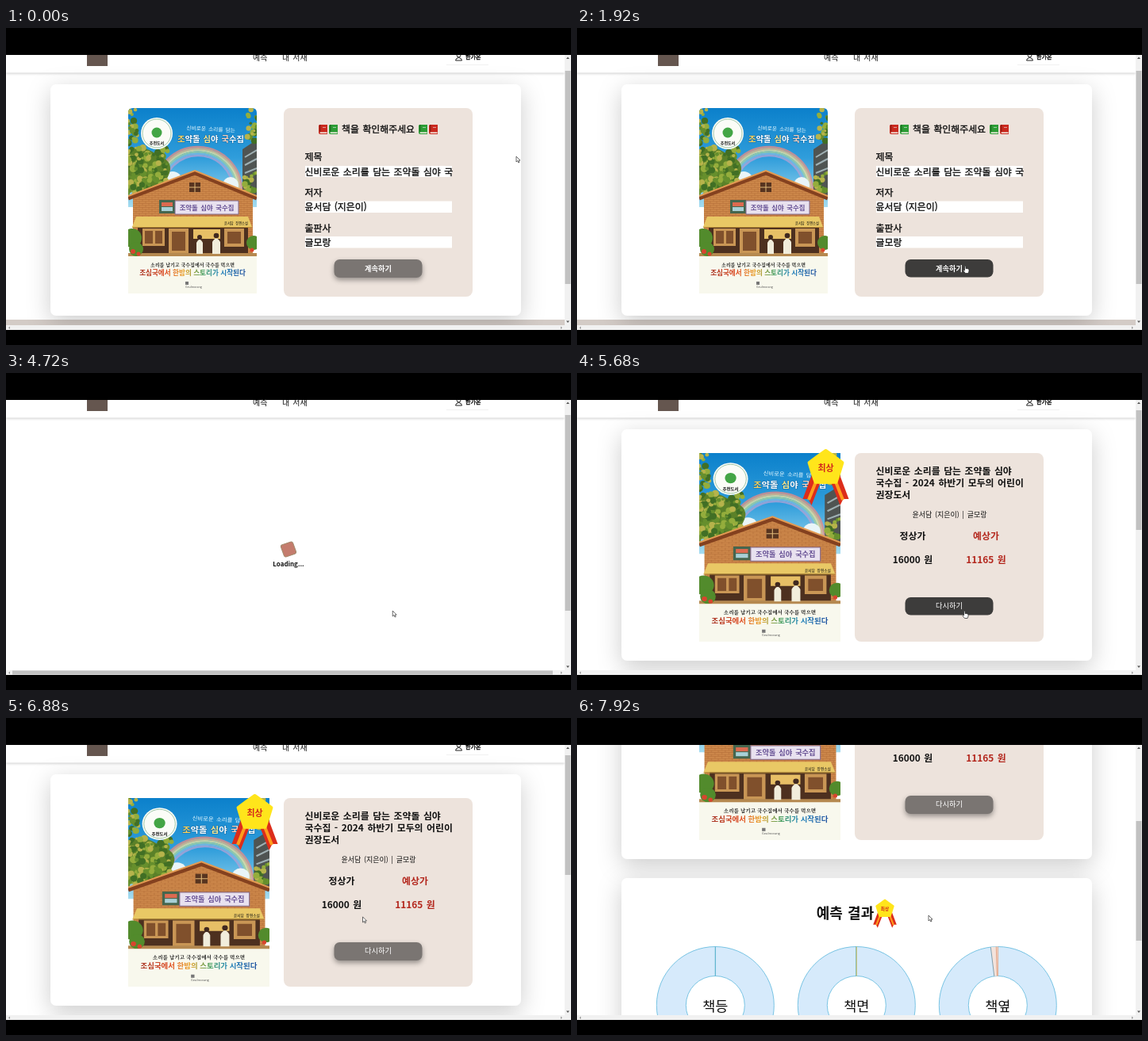
An HTML page that plays this animation: 712 px wide and 400 px high, repeating every 8 s.

```html
<!DOCTYPE html>
<html lang="ko">
<head>
<meta charset="utf-8">
<style>
  html, body { margin: 0; width: 100%; height: 100%; overflow: hidden; background: #000; }
  svg { font: 11.9px "Noto Sans CJK KR", "Noto Sans CJK", "Noto Sans", sans-serif; word-spacing: 1.2px; }
  #stage { display: block; width: 712px; height: 400px; }
  text { fill: #111; }
  .mid { text-anchor: middle; }
  .medium text, text.medium { stroke: #111; stroke-width: .35px; }
  .bold { font-weight: 700; }
  .small { font-size: 9.2px; }
  .red { fill: #b3261c; }
  .card { fill: #fff; filter: drop-shadow(0 8px 15px rgba(0,0,0,.2)); }
  .panel { fill: #ede3dc; }
  .rest { fill: #7a7572; filter: drop-shadow(0 3px 3px rgba(0,0,0,.38)); }
  .hover { fill: #3d3c3b; }
  .button text { fill: #fff; }
</style>
</head>
<body>
<svg id="stage" viewBox="0 0 712 400">
  <defs>
    <clipPath id="view"><rect y="34" width="704" height="341"/></clipPath>
    <clipPath id="coverEdge"><path d="M0 6Q0 0 6 0H156Q162 0 162 6V234H0Z"/></clipPath>
    <linearGradient id="sky" x2="0" y2="1"><stop stop-color="#0b80cb"/><stop offset=".5" stop-color="#2f9ddb"/><stop offset="1" stop-color="#a5dcf0"/></linearGradient>
    <linearGradient id="spectrum"><stop stop-color="#a52c1c"/><stop offset=".25" stop-color="#df4a20"/><stop offset=".42" stop-color="#e9a024"/><stop offset=".6" stop-color="#3c9a58"/><stop offset=".75" stop-color="#2387bd"/><stop offset="1" stop-color="#1d4f9e"/></linearGradient>
    <pattern id="brick" width="8" height="5" patternUnits="userSpaceOnUse"><path fill="#cf8a4c" d="M0 0H8V5H0Z"/><path d="M0 .5H8M2 0V2.5M6 2.5V5M0 3H8" stroke="#b06a35" stroke-width=".6"/></pattern>

    <symbol id="cover" viewBox="0 0 162 234" preserveAspectRatio="none">
      <path fill="url(#sky)" d="M0 0H162V125H0Z"/>
      <g id="rainbow" fill="none" stroke-width="2.4" opacity=".75"></g>
      <g fill="#e9f5f8"><circle cx="56" cy="92" r="12"/><circle cx="42" cy="100" r="14"/><circle cx="129" cy="97" r="10"/></g>
      <path fill="#4f5452" d="M144 52L162 40V110H144Z"/>
      <path stroke="#9fb0b3" stroke-width="2" d="M147 62L162 53M147 72L162 64M147 82L162 76"/>
      <path fill="#5b8129" d="M0 52Q16 46 32 56Q58 66 52 82Q44 104 20 106H0Z"/>
      <g id="leaves"></g>
      <path fill="url(#brick)" d="M6 110L84 84L157 110V190H6Z"/>
      <path fill="none" stroke="#84411f" stroke-width="5" d="M0 114L84 82L162 114"/>
      <path fill="none" stroke="#e39a52" stroke-width="2" d="M0 111L84 79L162 111"/>
      <path fill="#57341f" d="M77 94H91V106H77Z"/><path stroke="#e0b878" d="M84 94V106M77 100H91"/>
      <path fill="#4d301f" d="M12 148H151V185H12Z"/>
      <path fill="#c99655" d="M18 152H46V174H18ZM51 152H76V184H51ZM121 152H146V175H121Z"/>
      <path fill="#80502c" d="M21 155H31V171H21ZM34 155H43V171H34ZM55 156H72V180H55ZM125 156H142V171H125Z"/>
      <path fill="#e7bf66" d="M82 153H116V165H82Z"/>
      <path fill="#b58950" d="M0 183H162V190H0Z"/>
      <path fill="#f1eddb" d="M86 184V170Q90 162 94 170V184ZM106 184V169Q111 160 116 169V184Z"/>
      <g fill="#40291f"><circle cx="90" cy="163" r="3"/><circle cx="111" cy="161" r="3.3"/></g>
      <path fill="#e9c865" d="M10 137H151L156 150H5Z"/>
      <path stroke="#b78b37" d="M5 150.5H156"/>
      <path fill="#45664e" d="M39 116H59V133H39Z"/><path fill="#dc6a50" d="M42 119H56V124H42Z"/><path fill="#a8d0d6" d="M42 125H56V130H42Z"/>
      <path fill="#e8e1ef" stroke="#80668b" d="M59 117H139V134H59Z"/>
      <text class="mid bold" x="99" y="129" style="font-size:8.4px;fill:#665094">조약돌 심야 국수집</text>
      <text class="mid" x="136" y="147" style="font-size:4.3px">윤서담 장편소설</text>
      <g fill="#528b2c"><circle cx="5" cy="164" r="12"/><circle cx="10" cy="178" r="9"/><circle cx="158" cy="170" r="9"/></g>
      <g fill="#d8452e"><circle cx="6" cy="181" r="3"/><circle cx="13" cy="184" r="2.5"/><circle cx="156" cy="179" r="2.5"/></g>
      <circle cx="36" cy="32" r="20" fill="#fbfcf7"/><circle cx="36" cy="32" r="18" fill="none" stroke="#6aa77a" stroke-width=".6"/>
      <circle cx="36" cy="31" r="6.5" fill="#43a545"/>
      <text class="mid bold" x="36" y="46" style="font-size:5px">추천도서</text>
      <text class="mid" x="104" y="29" transform="rotate(3 104 29)" style="font-size:6.7px;fill:#e9faff">신비로운 소리를 담는</text>
      <text class="mid bold" x="104" y="43" style="font-size:10.3px;fill:#fff;stroke:#176da7;stroke-width:1px;paint-order:stroke"><tspan fill="#ffd45a">조</tspan>약돌 <tspan fill="#ffe88b">심</tspan>야 <tspan fill="#ffd0bb">국</tspan>수집</text>
      <path fill="#f8f8ed" d="M0 187H162V234H0Z"/>
      <text class="mid bold" x="81" y="200" style="font-family:'Noto Serif CJK KR','Noto Sans CJK KR',serif;font-size:6px;word-spacing:0">소리를 남기고 국수집에서 국수를 먹으면</text>
      <text class="mid bold" x="81" y="211" style="font-size:8.6px;word-spacing:0;fill:url(#spectrum)">조심국에서 한밤의 스토리가 시작된다</text>
      <path fill="#777" d="M72 219H76V223H72Z"/>
      <text x="72" y="227" style="font-size:3.6px;fill:#555">Geulmorang</text>
    </symbol>

    <g id="ribbon">
      <path fill="#dc2d1b" d="M4 0L17 -4L29 28L22 28L18 36Z"/>
      <path stroke="#ff9d1c" stroke-width="4" d="M10 0L21.5 29"/>
    </g>
    <g id="medal">
      <use href="#ribbon"/><use href="#ribbon" transform="scale(-1 1)"/>
      <path id="star" fill="#ffe51b" stroke="#ffe51b" stroke-width="4" stroke-linejoin="round"/>
      <text class="mid bold" y="-7.5" style="font-size:11px;fill:#d32a1c">최상</text>
    </g>

    <g id="book"><path d="M1 0H11V12H2Q0 12 0 10V1Z"/><path fill="#f7f2e8" d="M1.5 9.5H10.5V11H2Z"/><path fill="#0004" d="M1 0H2.5V9H1Z"/><path fill="#fff8" d="M5 3H9V4H5Z"/></g>
  </defs>

  <rect y="34" width="712" height="347" fill="#fff"/>
  <g clip-path="url(#view)">
    <g id="page">
      <rect y="10" width="704" height="46.5" fill="#fff" style="filter:drop-shadow(0 1px 1.5px rgba(0,0,0,.2))"/>
      <rect x="102" y="22" width="26" height="26" fill="#65564f"/>
      <text x="311" y="40.5" style="font-size:10px">예측</text>
      <text x="348" y="40.5" style="font-size:10px">내 서재</text>
      <path d="M555 46.5H608" stroke="#f0f0f0"/>
      <g fill="none" stroke="#222"><circle cx="570.5" cy="34.5" r="2.3"/><path d="M566.5 41Q567 37.5 570.5 37.5T574.5 41Z"/></g>
      <text class="medium" x="579" y="38.5" style="font-size:7px">한가온</text>

      <g id="form">
        <rect y="368" width="704" height="8" fill="#d3cbc6"/>
        <rect class="card" x="56" y="71" width="593" height="292" rx="7"/>
        <use href="#cover" width="162" height="234" transform="translate(154 101)" clip-path="url(#coverEdge)"/>
        <rect class="panel" x="350" y="101" width="238" height="238" rx="8"/>
        <use href="#book" x="394" y="122" fill="#c9291e"/><use href="#book" x="407" y="122" fill="#2c9c35"/>
        <use href="#book" x="520" y="122" fill="#2c9c35"/><use href="#book" x="533" y="122" fill="#c9291e"/>
        <text class="mid medium" x="469" y="132">책을 확인해주세요</text>
        <path fill="#fff" d="M377 174H562V188H377ZM377 218.5H562V233H377ZM377 263H562V277.5H377Z"/>
        <g class="medium">
          <text x="376.5" y="167">제목</text><text x="376.5" y="185.5">신비로운 소리를 담는 조약돌 심야 국</text>
          <text x="376.5" y="211.5">저자</text><text x="376.5" y="230">윤서담 (지은이)</text>
          <text x="376.5" y="256.5">출판사</text><text x="376.5" y="274.5">글모랑</text>
        </g>
        <g class="button">
          <rect class="rest" x="413.5" y="292" width="111" height="23" rx="7"/>
          <rect class="hover" x="413.5" y="292" width="111" height="22.5" rx="7"/>
          <text class="mid small bold" x="469" y="306.5">계속하기</text>
        </g>
      </g>

      <g id="loading">
        <rect id="spinner" x="-8" y="-8" width="16" height="16" rx="2.5" fill="#c47c6d" stroke="#a28a6c"/>
        <text class="mid bold" x="356" y="244" style="font-size:8px">Loading...</text>
      </g>

      <g id="result">
        <rect class="card" x="56" y="71" width="593" height="292" rx="7"/>
        <use href="#cover" x="154" y="101" width="178" height="238"/>
        <rect class="panel" x="350" y="101" width="238" height="238" rx="8"/>
        <use href="#medal" x="313.5" y="131"/>
        <g class="bold">
          <text x="376.5" y="128">신비로운 소리를 담는 조약돌 심야</text>
          <text x="376.5" y="143">국수집 - 2024 하반기 모두의 어린이</text>
          <text x="376.5" y="158">권장도서</text>
          <text class="mid" x="423" y="209.5">정상가</text><text class="mid red" x="515.5" y="209.5">예상가</text>
          <text class="mid" x="423" y="239.5">16000 원</text><text class="mid red" x="515.5" y="239.5">11165 원</text>
        </g>
        <text class="mid" x="469.5" y="181.5" style="font-size:9px">윤서담 (지은이) | 글모랑</text>
        <g class="button">
          <rect class="rest" x="413.5" y="283" width="111" height="23" rx="7"/>
          <rect class="hover" x="413.5" y="283" width="111" height="22.5" rx="7"/>
          <text class="mid small" x="469" y="297">다시하기</text>
        </g>
        <rect class="card" x="56" y="387" width="593" height="320" rx="7"/>
        <text class="mid bold" x="338" y="437.5" style="font-size:18px">예측 결과</text>
        <use href="#medal" transform="translate(388 431.5) scale(.51)"/>
        <g id="charts"></g>
      </g>
    </g>
  </g>

  <rect x="704" y="34" width="8" height="347" fill="#f1f1f1"/>
  <rect y="375" width="712" height="6" fill="#f1f1f1"/>
  <rect id="thumb" x="704.5" width="7" fill="#c1c1c1"/>
  <rect id="wideThumb" x="8" y="375.5" width="681" height="5" fill="#c1c1c1"/>
  <path fill="#555" d="M706 39H710L708 36.5ZM706 369.5H710L708 372Z"/>
  <path fill="#999" d="M5 376.5V380L3 378.2ZM699 376.5V380L701 378.2Z"/>

  <g id="cursor" stroke-linejoin="round">
    <path id="arrow" fill="#fff" stroke="#444" stroke-width=".8" d="M0 0V7L1.7 5.5L2.8 8L4 7.5L2.9 5.1H5Z"/>
    <path id="hand" fill="#fff" stroke="#222" stroke-width=".7" d="M.5 6V1Q1.3 -.4 2 1V3.5Q4 3 6 4.5V7L5 9.5H1.5L-1 6.5Q-1 5 .5 6Z"/>
  </g>
  <path d="M0 0H712V34H0ZM0 381H712V400H0Z"/>
</svg>
<script>
const LOOP = 8000, LOADING_FROM = 2560, LOADING_TO = 5600, SCROLL = 185;
const el = id => document.getElementById(id);
const clamp = x => Math.min(1, Math.max(0, x));
const smooth = x => (x = clamp(x), x * x * (3 - 2 * x));
const mix = (a, b, k) => a + (b - a) * k;
const show = (node, on) => { node.style.display = on ? '' : 'none'; };

el('star').setAttribute('d', 'M' + Array.from({ length: 10 }, (_, i) => {
  const angle = i * Math.PI / 5, r = i % 2 ? 18 : 22;
  return `${r * Math.sin(angle)} ${-11 - r * Math.cos(angle)}`;
}).join('L') + 'Z');

el('rainbow').innerHTML = ['#ec8c83', '#f4b47d', '#f5e599', '#a9d6a0', '#83bfe3', '#b4a3d6']
  .map((color, i) => `<circle cx="88" cy="104" r="${55 - 2.2 * i}" stroke="${color}"/>`).join('');

let seed = 7;
const random = () => (seed = seed * 16807 % 2147483647) / 2147483647;
const greens = ['#416f25', '#668f2d', '#94ad3c', '#b6b34b'];
const foliage = (count, x, y, w, h) => Array.from({ length: count }, (_, i) =>
  `<circle cx="${x + w * random() ** 1.3}" cy="${y + h * random()}" r="${1.5 + 3 * random()}" fill="${greens[i % 4]}"/>`).join('');
el('leaves').innerHTML = foliage(150, -2, 50, 52, 58) + foliage(24, -2, 0, 14, 50) + foliage(24, 150, 0, 14, 42) + foliage(20, 146, 80, 16, 26);

const ring = '#d6eafb', edge = '#6dbfe0';
const slices = [
  '<path stroke="#36a2c0" d="M0 -74V-37"/>',
  '<path stroke="#c9b44c" d="M0 -74V-37"/><path stroke="#58a99b" stroke-width=".6" d="M-.8 -74V-37"/>',
  '<path fill="#f3e3dc" d="M0 -74Q-4.5 -74 -9 -73.4L-4.5 -36.7L0 -37Z"/><path stroke="#e29b78" d="M0 -74V-37M-2 -74L-1 -37"/><path stroke="#7898a5" d="M-9 -73.4L-4.5 -36.7"/>'
];
el('charts').innerHTML = ['책등', '책면', '책옆'].map((label, i) =>
  `<g transform="translate(${174.3 + 178 * i} 547.5)" fill="none" stroke-width=".9">
    <circle r="55.5" stroke="${ring}" stroke-width="37"/>
    <circle r="74" stroke="${edge}"/><circle r="37" stroke="${edge}"/>${slices[i]}
    <text class="mid" y="7" style="font-size:17.5px">${label}</text></g>`).join('');

// time, x, y of the pointer tip
const route = [[0, 643, 162], [100, 643, 162], [720, 533, 195], [1500, 488, 300], [6200, 487, 300], [6800, 450, 251], [7300, 443, 249], [LOOP, 443, 249]];
function pointerAt(t) {
  const i = route.findIndex(p => p[0] > t);
  const [t0, x0, y0] = route[i - 1], [t1, x1, y1] = route[i];
  const k = smooth((t - t0) / (t1 - t0));
  return [mix(x0, x1, k), mix(y0, y1, k)];
}

function draw(now) {
  const t = now % LOOP;
  const isForm = t < LOADING_FROM, isResult = t >= LOADING_TO, isLoading = !isForm && !isResult;
  show(el('form'), isForm);
  show(el('loading'), isLoading);
  show(el('result'), isResult);
  show(el('wideThumb'), isLoading);

  const scrolled = (smooth((t - 7050) / 320) + smooth((t - 7380) / 320)) / 2;
  el('page').setAttribute('transform', `translate(0 ${-SCROLL * scrolled})`);
  const [top, height] = isForm ? [54, 269] : isLoading ? [53, 247] : [47 + 83 * scrolled, 151];
  el('thumb').setAttribute('y', top);
  el('thumb').setAttribute('height', height);

  el('spinner').setAttribute('transform', `translate(356 222.5) rotate(${(t - 4720) * .3 - 20})`);

  const [x, y] = pointerAt(t);
  const buttonTop = isForm ? 292 : 283;
  const hovering = !isLoading && x > 413 && x < 525 && y > buttonTop && y < buttonTop + 23;
  document.querySelectorAll('.hover').forEach(node => show(node, hovering));
  document.querySelectorAll('.rest').forEach(node => show(node, !hovering));
  show(el('hand'), hovering);
  show(el('arrow'), !hovering);
  el('cursor').setAttribute('transform', `translate(${x} ${y})`);
  requestAnimationFrame(draw);
}
requestAnimationFrame(draw);
</script>
</body>
</html>
```
